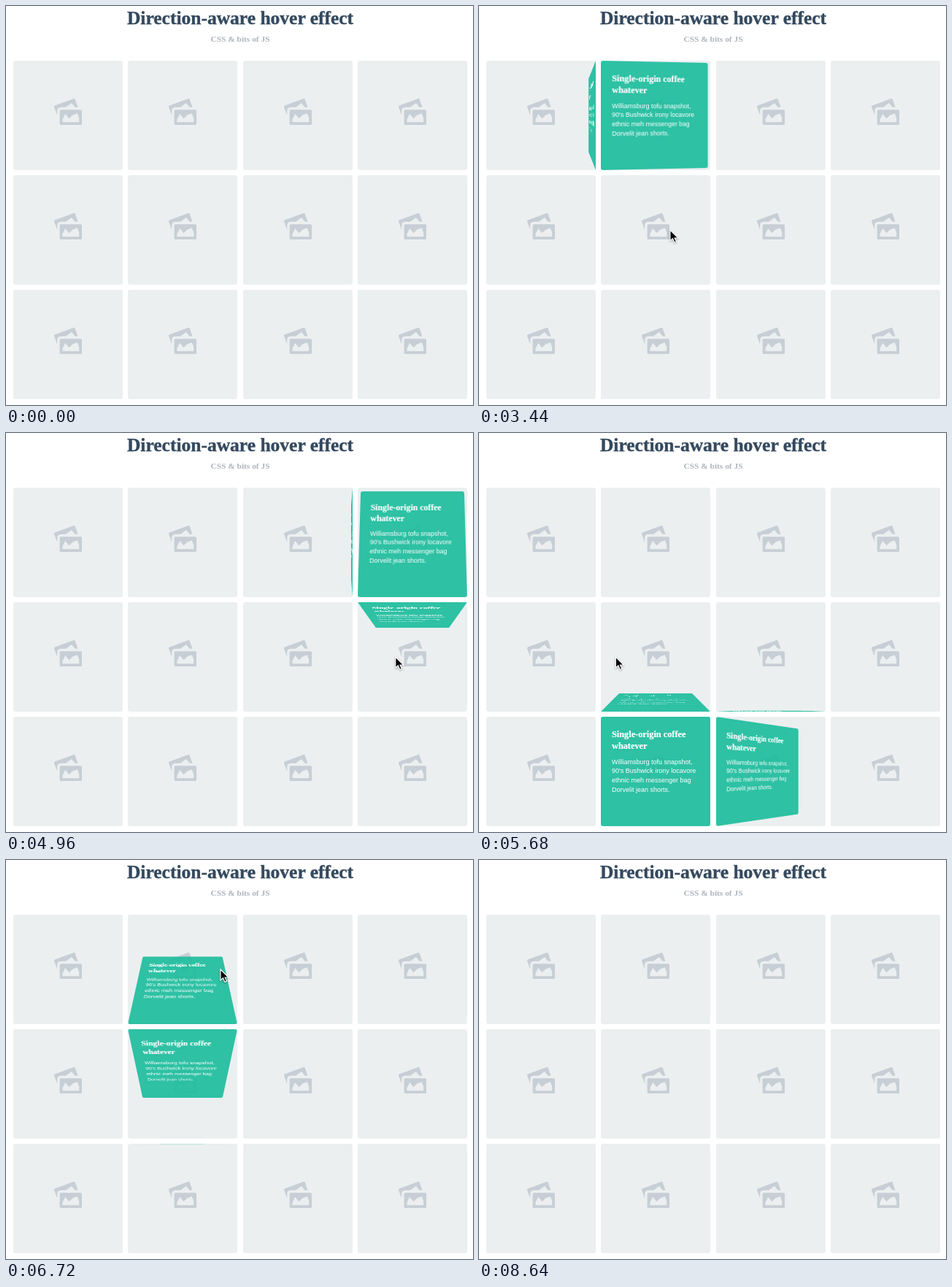
Animation of 640 by 547 pixels, one loop 9.36 s. Source, as an HTML page:

```html
<!DOCTYPE html>
<html lang="en">
<head>
<meta charset="utf-8">
<title>Direction-aware hover effect</title>
<style>
  html, body { margin: 0; width: 100%; height: 100%; overflow: hidden; background: #fff; }
  #stage { position: relative; width: 640px; height: 547px; overflow: hidden; }
  h1, h2, h3, p { position: absolute; margin: 0; white-space: nowrap; }
  h1, h2, h3 { font-family: "Liberation Serif", Times, serif; font-weight: bold; }
  h1, h2 { left: 1px; width: 640px; text-align: center; }
  h1 { top: 2px; font-size: 25.5px; line-height: 30px; color: #34495e; -webkit-text-stroke: .4px #34495e; }
  h2 { top: 37.5px; font-size: 11.4px; line-height: 14px; color: #adb5bd; }
  .tile { position: absolute; width: 150px; height: 150px; border-radius: 3px; background: #ebeff0; perspective: 300px; }
  .tile svg { position: absolute; left: 56px; top: 52px; width: 38px; height: 38px; fill: #c7ced5; }
  .info { position: absolute; inset: 0; border-radius: 3px; background: rgba(26, 188, 156, .9); color: #fff; }
  h3 { left: 15px; top: 17px; font-size: 12.3px; line-height: 15.8px; -webkit-text-stroke: .2px #fff; }
  p { left: 15px; top: 55.5px; font: 9px/12.9px "Liberation Sans", Arial, sans-serif; }
  #cursor { position: absolute; left: 0; top: 0; overflow: visible; filter: drop-shadow(0 1px 1px rgba(0, 0, 0, .35)); }
</style>
</head>
<body>
<div id="stage">
  <h1>Direction-aware hover effect</h1>
  <h2>CSS &amp; bits of JS</h2>
</div>
<script>
const LOOP = 9360, STEP = 80, TURN = 300;
const LAG = 130; // the tiles answer this long after the pointer

// Tile index step, side left through, side entered (C cuts across a corner)
const moves = {
  U: [-4, 'top', 'bottom'], D: [4, 'bottom', 'top'],
  L: [-1, 'left', 'right'], R: [1, 'right', 'left'], C: [1, 'right', 'top']
};

// Each run of moves is spread evenly up to the next start time
const runs = [
  [2900, 'D'], [3225, 'R'], [3480, 'DRUL'], [4055, 'D'], [4222, 'C'], [4290, 'U'],
  [4700, 'RDL'], [5410, 'D'], [5615, 'L'], [5680, 'U'], [5820, 'LDRU'], [6638, 'U'],
  [6920, 'RDR'], [7370, 'U'], [8020, 'L'], [8330, 'U'], [8480, '']
];

const visits = [];
let tile = -4; // above the first tile
runs.slice(0, -1).forEach(([start, steps], i) => {
  const pace = (runs[i + 1][0] - start) / steps.length;
  [...steps].forEach((letter, k) => {
    const [delta, exit, entry] = moves[letter];
    if (visits.length) visits.at(-1).exit = exit;
    tile += delta;
    visits.push({ tile, entry, start: start + k * pace, end: start + (k + 1) * pace });
  });
});

const tileX = i => Math.round(10 + (i + 4) % 4 * 157.4);
const tileY = i => 75 + Math.floor(i / 4) * 157;

// The pointer waits, then crosses the middle of each tile halfway through its visit
const path = [
  [1920, 113, 90], [2880, 113, 90],
  ...visits.map(v => [(v.start + v.end) / 2 - LAG, tileX(v.tile) + 75, tileY(v.tile) + 75])
];

const stage = document.getElementById('stage');
const panels = [];
for (let i = 0; i < 12; i++) {
  const box = document.createElement('div');
  box.className = 'tile';
  box.style.left = tileX(i) + 'px';
  box.style.top = tileY(i) + 'px';
  box.innerHTML = `
    <svg viewBox="0 0 20 20"><path fill-rule="evenodd" d="M17.1 6.2 15.1.5Q14.8-.2 14.1 0L.5 5Q-.1 5.3 0 6L2.2 12V8.8
      Q2.3 6.3 4.8 6.2H8.4L12.6 3.2 15.1 6.2ZM19.2 8H4.8Q4 8 4 8.8V18.2Q4 19 4.8 19H19.2Q20 19 20 18.2V8.8Q20 8 19.2 8Z
      M18 17H6V15L8 11 10.8 14.4 13.4 11.8 16.7 10.6 18 14Z"/></svg>
    <div class="info">
      <h3>Single-origin coffee<br>whatever</h3>
      <p>Williamsburg tofu snapshot,<br>90's Bushwick irony locavore<br>ethnic meh messenger bag<br>Dorvelit jean shorts.</p>
    </div>`;
  stage.append(box);
  panels.push(box.querySelector('.info'));
}
stage.insertAdjacentHTML('beforeend', `
  <svg id="cursor" width="14" height="20"><path d="M0 0V15L3.5 11.8 6 17.3 8.6 16.2 6.2 11H11Z"
    stroke="#fff" stroke-width="1.2"/></svg>`);
const cursor = document.getElementById('cursor');

// The CSS "ease" curve
function ease(x) {
  if (x >= 1) return 1;
  const bezier = (a, b, s) => 3 * a * s * (1 - s) ** 2 + 3 * b * s * s * (1 - s) + s ** 3;
  let low = 0, high = 1;
  for (let i = 0; i < 20; i++) {
    const mid = (low + high) / 2;
    if (bezier(.25, .25, mid) < x) low = mid; else high = mid;
  }
  return bezier(.1, 1, low);
}

// Every panel swings away from the viewer around its hinge
function swing(hinge, angle) {
  const axis = hinge === 'top' || hinge === 'bottom' ? 'X' : 'Y';
  const sign = hinge === 'top' || hinge === 'right' ? -1 : 1;
  return `rotate${axis}(${sign * angle}deg)`;
}

function posePanel(panel, i, t) {
  const visit = visits.findLast(v => v.tile === i && t >= v.start);
  const visible = visit && t < visit.end + TURN;
  panel.style.display = visible ? 'block' : 'none';
  if (!visible) return;

  const leaving = t >= visit.end;
  const progress = ease((t - (leaving ? visit.end : visit.start)) / TURN);
  const hinge = leaving ? visit.exit : visit.entry;
  panel.style.transformOrigin = hinge;
  panel.style.transform = swing(hinge, leaving ? 104 * progress : 90 * (1 - progress));
}

function poseCursor(t) {
  const i = path.findIndex(point => point[0] > t);
  cursor.style.display = i > 0 ? 'block' : 'none';
  if (i < 1) return;
  const [t0, x0, y0] = path[i - 1], [t1, x1, y1] = path[i];
  const k = (t - t0) / (t1 - t0);
  cursor.style.transform = `translate(${x0 + (x1 - x0) * k}px, ${y0 + (y1 - y0) * k}px)`;
}

function draw() {
  const t = Math.floor(performance.now() % LOOP / STEP) * STEP;
  panels.forEach((panel, i) => posePanel(panel, i, t));
  poseCursor(t);
  requestAnimationFrame(draw);
}
draw();
</script>
</body>
</html>
```
